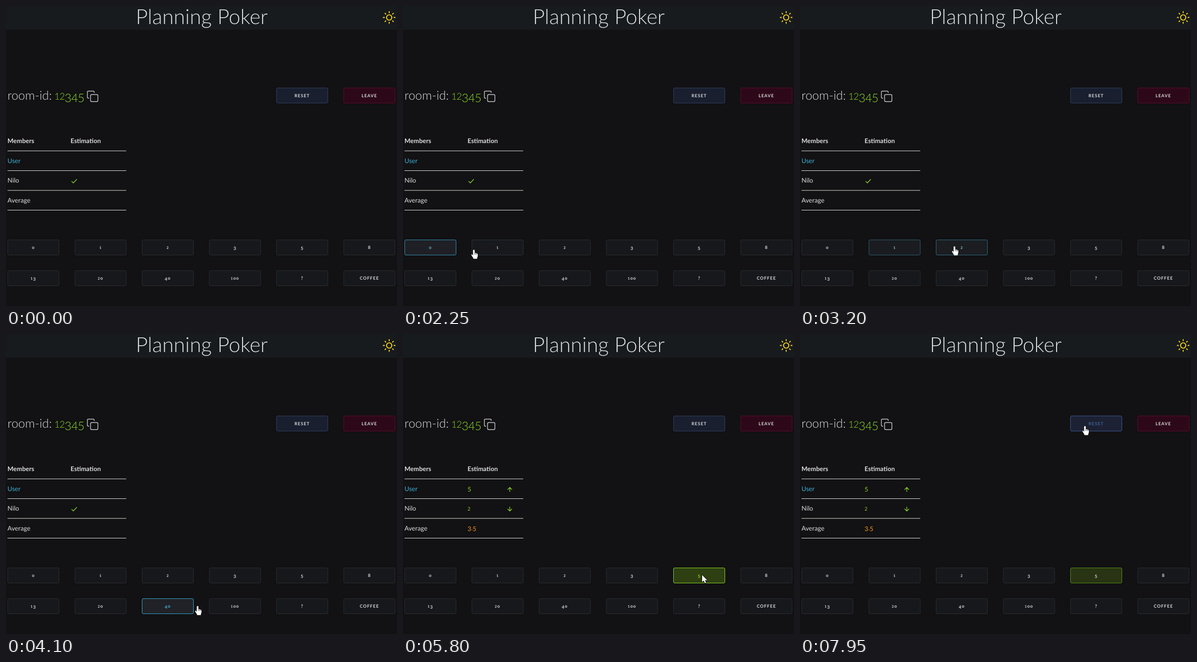
These frames come from a looping animation (800 px wide and 615 px high, 8 s). An HTML page with a canvas:

```html
<!DOCTYPE html>
<html lang="en">
<head>
<meta charset="utf-8">
<title>Planning Poker</title>
<style>
html, body { margin: 0; width: 800px; height: 615px; overflow: hidden; background: #121113; }
canvas { display: block; }
</style>
</head>
<body>
<canvas id="stage" width="800" height="615"></canvas>
<script>
const ctx = document.getElementById('stage').getContext('2d');
ctx.textRendering = 'geometricPrecision';

const LOOP = 8000, STEP = 50, FADE = 200;
const CLICK = 5000, REVEAL = 5050, POINTER_IN = 2000;
const COLUMN = 137.5;

const GREEN = '#84d62a', LIGHT = '#dcdee0';
const THEMES = {
  card: { fill: [22, 24, 27], edge: [43, 45, 49], text: [216, 218, 220],
          hotFill: [34, 35, 40], hotEdge: [52, 181, 224], hotText: [63, 176, 213] },
  chosen: { fill: [40, 52, 19], edge: [84, 144, 22], text: [216, 218, 220],
            hotFill: [46, 63, 18], hotEdge: [134, 216, 31], hotText: [134, 216, 42] },
  reset: { fill: [25, 31, 46], edge: [48, 64, 100], text: [216, 218, 220],
           hotFill: [28, 33, 51], hotEdge: [60, 90, 150], hotText: [64, 96, 150] },
  leave: { fill: [45, 8, 24], edge: [92, 12, 44], text: [216, 218, 220] }
};

const CARDS = ['0', '1', '2', '3', '5', '8', '13', '20', '40', '100', '?', 'COFFEE'];

// label: [enter, leave]
const HOVERS = {
  '0': [2000, 2200], '1': [2240, 3070], '2': [3110, 3800], '40': [3880, 4080],
  '100': [4140, 4270], '5': [4420, 7040], RESET: [7740, 9000]
};

// time, x, y of the pointer's hot spot
const PATH = [
  [2000, 48, 508], [2100, 80, 506], [2200, 125, 502], [2250, 145, 500],
  [2350, 170, 497], [2800, 200, 495], [2900, 200, 495], [3050, 244, 495],
  [3200, 316, 493], [3450, 335, 494], [3750, 335, 494], [3900, 336, 545],
  [4000, 350, 556], [4100, 392, 558], [4250, 480, 548], [4400, 560, 512],
  [4550, 612, 494], [7000, 612, 494], [7250, 592, 367], [7550, 584, 235],
  [7800, 583, 189]
];

const clamp = v => Math.max(0, Math.min(1, v));
const lerp = (a, b, k) => a + (b - a) * k;
const blend = (a, b, k) => a.map((v, i) => lerp(v, b[i], k));
const rgb = c => `rgb(${c.map(Math.round).join(',')})`;

function hoverAmount(label, t) {
  if (!HOVERS[label]) return 0;
  const [enter, leave] = HOVERS[label];
  const peak = clamp((leave - enter) / FADE);
  return t < leave ? clamp((t - enter) / FADE) : clamp(peak - (t - leave) / FADE);
}

function pointerAt(t) {
  const i = PATH.findIndex(p => p[0] > t);
  if (i < 0) return PATH[PATH.length - 1].slice(1);
  const a = PATH[i - 1], b = PATH[i], k = (t - a[0]) / (b[0] - a[0]);
  return [lerp(a[1], b[1], k), lerp(a[2], b[2], k)];
}

function setFont(weight, size, spacing) {
  ctx.font = `${weight} ${size}px Lato, "Open Sans", sans-serif`;
  ctx.letterSpacing = spacing + 'px';
}

// Old-style figures: 0-2 sit at x-height, 3, 4, 5, 7 and 9 hang below the line.
function glyph(ch, size) {
  if (ch === '0') return { ch: 'o', size, drop: 0 };
  if ('12'.includes(ch)) return { ch, size: size * 0.8, drop: 0 };
  return { ch, size, drop: '34579'.includes(ch) ? size * 0.19 : 0 };
}

function text(str, x, y, { size, weight = 400, color = LIGHT, spacing = 0, center = false }) {
  ctx.fillStyle = color;
  const figures = /^[\d.]+$/.test(str);
  const parts = figures ? [...str].map(c => glyph(c, size)) : [{ ch: str, size, drop: 0 }];
  for (const p of parts) {
    setFont(weight, p.size, spacing);
    p.width = ctx.measureText(p.ch).width;
  }
  if (center) x -= (parts.reduce((sum, p) => sum + p.width, 0) - spacing) / 2;
  for (const p of parts) {
    setFont(weight, p.size, spacing);
    ctx.fillText(p.ch, x, y + p.drop);
    x += p.width;
  }
}

function stroke(path, color, width) {
  ctx.strokeStyle = color;
  ctx.lineWidth = width;
  ctx.lineCap = ctx.lineJoin = 'round';
  ctx.stroke(new Path2D(path));
}

function button(label, column, y, theme, hot) {
  const x = 3 + column * COLUMN;
  const mix = (base, over) => rgb(over ? blend(base, over, hot) : base);
  ctx.beginPath();
  ctx.roundRect(x + 0.5, y + 0.5, 105, 31, 2.5);
  ctx.fillStyle = mix(theme.fill, theme.hotFill);
  ctx.fill();
  ctx.strokeStyle = mix(theme.edge, theme.hotEdge);
  ctx.lineWidth = 1;
  ctx.stroke();
  text(label, x + 52.5, y + 19.2,
    { size: 9, weight: 700, spacing: 1, center: true, color: mix(theme.text, theme.hotText) });
}

function header() {
  ctx.fillStyle = '#171b1e';
  ctx.fillRect(0, 0, 800, 48.5);
  text('Planning Poker', 400.5, 37, { size: 42.5, weight: 300, center: true });
  ctx.save();
  ctx.translate(784, 23.5);
  stroke('M5.4 0A5.4 5.4 0 1 1 -5.4 0A5.4 5.4 0 1 1 5.4 0', '#ffd91a', 1.9);
  for (let i = 0; i < 8; i++) {
    stroke('M9.8 0H12', '#ffd91a', 1.9);
    ctx.rotate(Math.PI / 4);
  }
  ctx.restore();
}

function room() {
  text('room-id:', 3, 192, { size: 25, weight: 300 });
  text('12345', 99, 192, { size: 24, weight: 300, color: '#8ce02c', spacing: -0.6 });
  stroke('M175.5 181.5H185.5Q188 181.5 188 184V193.5Q188 196 185.5 196H175.5' +
    'Q173 196 173 193.5V184Q173 181.5 175.5 181.5Z', '#c8cacc', 1.4);
  stroke('M169.5 189H168.5Q166.5 189 166.5 187V176.5Q166.5 174.5 168.5 174.5H178.5' +
    'Q180.5 174.5 180.5 176.5V177.5', '#c8cacc', 1.4);
}

function table(revealed) {
  const body = { size: 13.2 };
  const value = color => ({ size: 13, color });
  text('Members', 3, 281, { size: 13, weight: 700 });
  text('Estimation', 132, 281, { size: 13, weight: 700 });
  text('User', 3, 321.5, { ...body, color: '#3fb0d5' });
  text('Nilo', 3, 362, body);
  text('Average', 3, 402.5, body);
  ctx.fillStyle = '#e4e5e6';
  for (let row = 0; row < 4; row++) ctx.fillRect(3, 296.5 + row * 40.5, 243, 1);
  if (!revealed) {
    stroke('M134.5 359.5L137.8 362.8L144.5 355.5', GREEN, 1.4);
    return;
  }
  text('5', 132, 321, value(GREEN));
  text('2', 132, 362, value(GREEN));
  text('3.5', 132, 402, value('#f39a1d'));
  stroke('M218.5 323V314.5M214.3 318.7L218.5 314.5L222.7 318.7', GREEN, 1.3);
  stroke('M218.5 354.5V363M214.3 358.8L218.5 363L222.7 358.8', GREEN, 1.3);
}

function buttons(t) {
  button('RESET', 4, 167.5, THEMES.reset, hoverAmount('RESET', t));
  button('LEAVE', 5, 167.5, THEMES.leave, 0);
  const picked = clamp((t - CLICK) / FADE);
  const chosen = {};
  for (const key in THEMES.card) chosen[key] = blend(THEMES.card[key], THEMES.chosen[key], picked);
  CARDS.forEach((label, i) => {
    const theme = label === '5' ? chosen : THEMES.card;
    button(label, i % 6, i < 6 ? 479 : 542, theme, hoverAmount(label, t));
  });
}

const HAND = new Path2D('M-1.7 11.5V1.2Q-1.7 -.5 0 -.5Q1.7 -.5 1.7 1.2V6' +
  'Q3 5.1 4 6.5Q5.3 5.8 6.1 7.2Q8 6.8 8 8.8V12Q8 14 6.8 15.8V18.3H-1.3V16.5' +
  'Q-3 14.5 -5 10.8Q-5.5 9.2 -4.2 9Q-3 9 -1.7 11.5Z');
const ARROW = new Path2D('M0 0V14.6L3.4 11.5L5.8 16.7L8.1 15.7L5.8 10.7H10.4Z');

function pointer(t) {
  if (t < POINTER_IN) return;
  const [x, y] = pointerAt(t);
  const arrow = t >= REVEAL && t < HOVERS.RESET[0];
  const shape = arrow ? ARROW : HAND;
  ctx.save();
  ctx.translate(x, y);
  ctx.lineJoin = 'round';
  ctx.lineWidth = 1.4;
  ctx.strokeStyle = '#08080a';
  ctx.stroke(shape);
  ctx.fillStyle = '#fff';
  ctx.fill(shape);
  if (!arrow) {
    ctx.lineWidth = 0.7;
    ctx.stroke(new Path2D('M1.7 6V9M4 6.8V9.3M6.1 7.5V9.6'));
  }
  ctx.restore();
}

function draw(now) {
  const t = Math.floor((now % LOOP) / STEP) * STEP;
  ctx.fillStyle = '#121113';
  ctx.fillRect(0, 0, 800, 615);
  header();
  room();
  table(t >= REVEAL);
  buttons(t);
  pointer(t);
}

let start;
function tick(now) {
  start ??= now;
  draw(now - start);
  requestAnimationFrame(tick);
}
requestAnimationFrame(tick);
</script>
</body>
</html>
```
